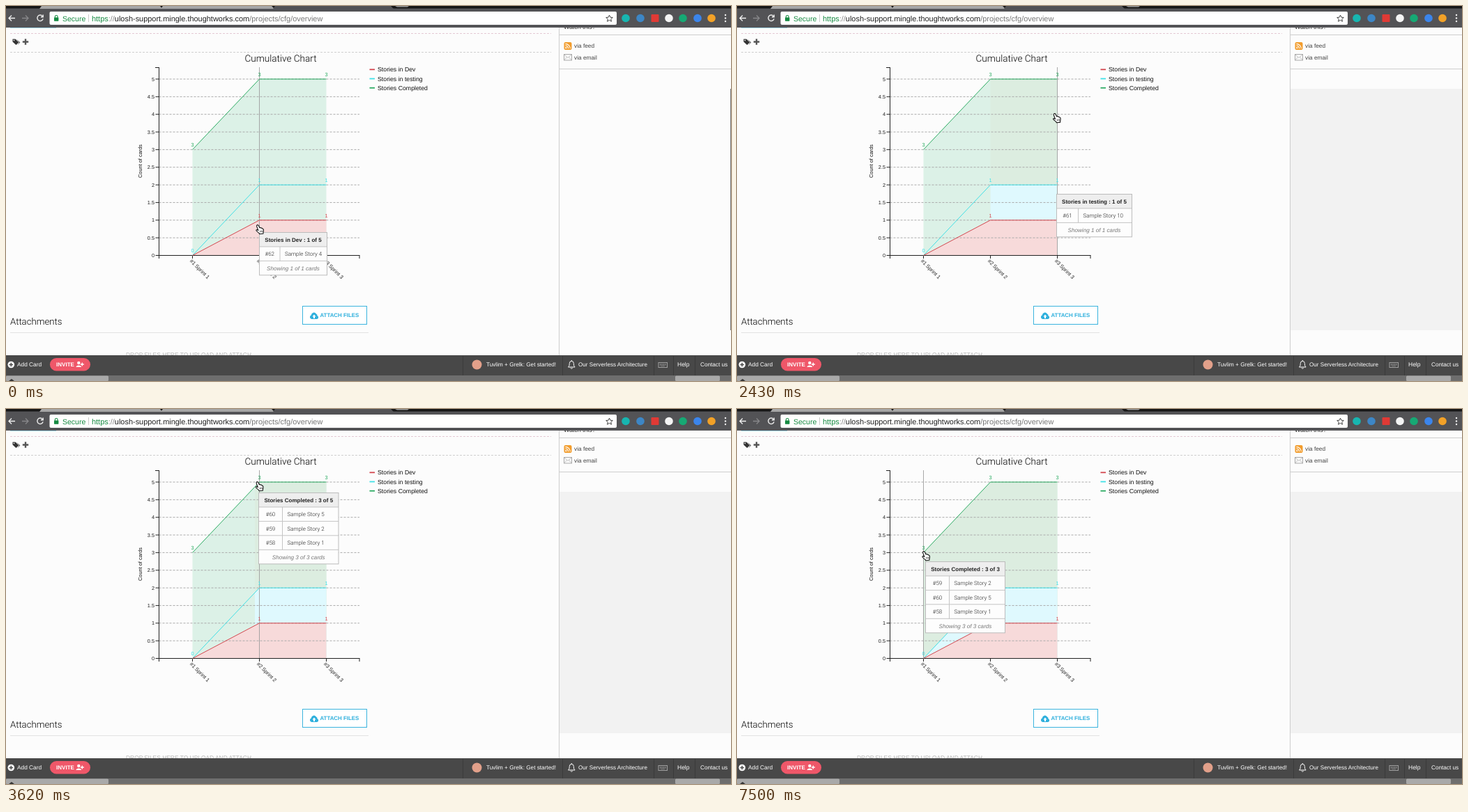
An HTML page for the animation above (8 s loop, 1040 by 539 pixels).

```html
<!DOCTYPE html>
<html lang="en">
<head>
<meta charset="utf-8">
<title>Cumulative Chart</title>
<style>
html, body { margin: 0; width: 100%; height: 100%; overflow: hidden; background: #fcfcfc; }
svg { display: block; width: 100vw; height: 100vh; font-family: "Liberation Sans", Arial, sans-serif; text-rendering: geometricPrecision; }
text { white-space: pre; }
.light { font-family: Roboto, "Liberation Sans", sans-serif; font-weight: 300; }
</style>
</head>
<body>
<svg id="stage" viewBox="0 0 1040 539" preserveAspectRatio="none"></svg>
<script>
const stage = document.getElementById('stage');
const RED = '#d3474f', CYAN = '#3fe0e6', GREEN = '#2bab62', TOOLBAR = '#535356';
const LOOP = 8000;

// Markup helpers
const rect = (x, y, w, h, fill, more = '') => `<rect x="${x}" y="${y}" width="${w}" height="${h}" fill="${fill}" ${more}/>`;
const line = (x1, y1, x2, y2, stroke, more = '') => `<path d="M${x1} ${y1}L${x2} ${y2}" stroke="${stroke}" fill="none" ${more}/>`;
const path = (d, fill, more = '') => `<path d="${d}" fill="${fill}" ${more}/>`;
const dot = (x, y, r, fill, more = '') => `<circle cx="${x}" cy="${y}" r="${r}" fill="${fill}" ${more}/>`;
const text = (x, y, s, size, fill = '#222', more = '') => `<text x="${x}" y="${y}" font-size="${size}" fill="${fill}" ${more}>${s}</text>`;
const mid = 'text-anchor="middle"', bold = 'font-weight="700"', light = 'class="light"';

// Chart scales
const px = [267.5, 363.5, 459.5];
const py = v => 358.5 - v * 50.7;
const points = vals => vals.map((v, i) => `${px[i]},${py(v).toFixed(1)}`).join(' ');
const area = (vals, fill) => `<polygon points="${points(vals)} 459.5,358.5 267.5,358.5" fill="${fill}"/>`;
const series = (vals, stroke) => `<polyline points="${points(vals)}" fill="none" stroke="${stroke}"/>`;
const dev = [0, 1, 1], testing = [0, 2, 2], done = [3, 5, 5];

function browserTop() {
  const icons = [[889, '#17b5b0'], [910, '#3d86c6'], [931, '#e03a35', 1], [951, '#f4f4f4'], [971, '#16a974'], [992, '#3b85ec'], [1012, '#f2a127']];
  return rect(0, 0, 1040, 31, TOOLBAR) + rect(0, 0, 1040, 3.5, '#161616') +
    path('M48 4L51 0H221L224 4Z', '#a6a6a6') + path('M222 4L225 0H381L385 4Z', '#a6a6a6') +
    path('M383 4L386 0H552L556 4Z', TOOLBAR) + path('M558 0H578L576 1.5H561Z', '#999') +
    path('M13 17.5H4M8 13.5L4 17.5L8 21.5', 'none', 'stroke="#f0f0f0" stroke-width="1.3"') +
    path('M23 17.5H32M28 13.5L32 17.5L28 21.5', 'none', 'stroke="#87878a" stroke-width="1.3"') +
    path('M52.3 14.6A4.2 4.2 0 1 0 53.1 18.4M53.2 12.6V15.8H50', 'none', 'stroke="#f0f0f0" stroke-width="1.4"') +
    rect(62.5, 8, 813.5, 19, '#fff', 'rx="2"') +
    rect(69, 16.5, 6.4, 5.2, '#168a42', 'rx=".6"') +
    path('M70.3 17V15.4A1.9 1.9 0 0 1 74.1 15.4V17', 'none', 'stroke="#168a42" stroke-width="1.1"') +
    text(81, 21.5, 'Secure', 10.5, '#168a42') + line(118.5, 12, 118.5, 23, '#ccc') +
    text(123, 21.5, '<tspan fill="#168a42">https</tspan><tspan fill="#888">://</tspan>ulosh-support.mingle.thoughtworks.com<tspan fill="#777">/projects/cfg/overview</tspan>', 10.95) +
    path('M865.5 13L866.9 16.2L870.3 16.5L867.7 18.8L868.5 22.2L865.5 20.4L862.5 22.2L863.3 18.8L860.7 16.5L864.1 16.2Z', 'none', 'stroke="#444"') +
    icons.map(([x, c, square]) => square ? rect(x - 5.5, 12, 11, 11, c, 'rx="1"') : dot(x, 17.5, 5.8, c)).join('') +
    [13, 17.5, 22].map(y => dot(1032, y, 1.2, '#f0f0f0')).join('');
}

function page() {
  return rect(0, 31, 1040, 471, '#fcfcfc') + line(6, 31.5, 72, 31.5, '#a5d9ee') +
    line(6, 39.5, 782, 39.5, '#e4c9d4', 'stroke-dasharray="3 2"') +
    line(6, 66.5, 782, 66.5, '#cfcfcf', 'stroke-dasharray="3 2"') +
    path('M9.5 47.5H13.5L18.3 52.2L14.5 56L9.5 51.5Z M14.8 47.5L20.2 52.3L16.4 56.2L19 52.2Z', '#333') + dot(11.5, 49.4, .8, '#fff') +
    path('M26.8 47.3H29.2V50.3H32.2V52.7H29.2V55.7H26.8V52.7H23.8V50.3H26.8Z', '#555') +
    line(793.5, 31, 793.5, 502, '#cdcdcd') +
    text(800, 33, 'Watch this?', 8.8, '#222') +
    line(794, 41.5, 1040, 41.5, '#cdcdcd') + line(794, 90.5, 1040, 90.5, '#cdcdcd') +
    rect(800.5, 52, 11, 11, '#f29c2c', 'rx="2"') + dot(803.3, 60.2, 1.1, '#fff') +
    path('M802.3 57A4 4 0 0 1 806.5 61.3M802.3 54.3A7 7 0 0 1 809.3 61.3', 'none', 'stroke="#fff" stroke-width="1.2"') +
    rect(800.5, 69.5, 11, 8.5, '#fafafa', 'stroke="#a9a9a9"') +
    path('M801 70L806 74.5L811 70M801 77.5L804.5 73.5M811 77.5L807.5 73.5', 'none', 'stroke="#b2b2b2" stroke-width=".8"') +
    text(815, 60, 'via feed', 8.3, '#444') + text(815, 77, 'via email', 8.3, '#444') +
    text(6, 457.8, 'Attachments', 13.2, '#000', light) +
    rect(425.5, 431.5, 92, 26, '#fff', 'stroke="#3bb4de"') +
    path('M438.6 450A3 3 0 0 1 437.9 444.2A3.8 3.8 0 0 1 444.9 442.4A2.7 2.7 0 0 1 446.6 445.2A2.5 2.5 0 0 1 445.8 450Z', '#2fb0dd') +
    path('M442 443.5L444.6 446.4H443V449H441V446.4H439.4Z', '#fff') +
    text(450.5, 447.4, 'ATTACH FILES', 7.9, '#2fb0dd', bold) +
    line(6, 469.5, 520, 469.5, '#e2e2e2') +
    text(172, 504, 'DROP FILES HERE TO UPLOAD AND ATTACH', 8.42, '#b5b5b5');
}

function footer() {
  const label = (x, s, size = 8.2) => text(x, 518, s, size, '#fff');
  return rect(0, 502, 1040, 29, '#484848') +
    [655.5, 798.5, 929.5, 957.5, 988.5].map(x => line(x, 503, x, 531, '#3a3a3a')).join('') +
    dot(7.3, 515.5, 4.8, '#fff') + path('M7.3 512.7V518.3M4.5 515.5H10.1', 'none', 'stroke="#484848" stroke-width="1.5"') +
    label(16, 'Add Card', 8.3) +
    rect(63, 506, 58, 18.5, '#ef5769', 'rx="9.2"') + text(72, 518, 'INVITE', 8.05, '#fff', bold) +
    dot(104.3, 513, 2.2, '#fff') + path('M100.5 519C100.5 515.5 108 515.5 108 519Z', '#fff') +
    path('M109.3 512.5V517.5M106.8 515H111.8', 'none', 'stroke="#fff" stroke-width="1.3"') +
    dot(675.5, 515.5, 7, '#e2a08a') + label(689, 'Tuvlim + Grelk: Get started!') +
    path('M806.5 519C808.5 517.5 808 515 808.3 513.5A3 3 0 0 1 814.3 513.5C814.6 515 814.1 517.5 816.1 519ZM811.3 510.5V509M810 520.3A1.4 1.4 0 0 0 812.6 520.3', 'none', 'stroke="#fff"') +
    label(821, 'Our Serverless Architecture', 8.1) +
    rect(936, 512.5, 12.5, 7, 'none', 'stroke="#a0a0a0"') +
    path('M938 514.7H947M938 516H947M939.5 517.6H945', 'none', 'stroke="#a0a0a0" stroke-dasharray="1 .7"') +
    label(963, 'Help', 8.5) + label(996, 'Contact us') +
    rect(0, 531, 1040, 8, '#6e6e6e') + rect(0, 531.5, 147, 7.5, '#a9a9a9', 'rx="1.5"') +
    rect(960, 531.5, 64, 7.5, '#a9a9a9', 'rx="1.5"') + path('M4 539L8 536L12 539Z', '#333');
}

function chart() {
  const steps = Array.from({ length: 11 }, (_, i) => i / 2);
  const tag = (i, v, s, fill) => text(px[i], py(v) - 4.3, s, 7.4, fill, mid);
  const legend = (i, s, c) => line(521.5, 91.3 + i * 13.2, 529, 91.3 + i * 13.2, c, 'stroke-width="1.8"') + text(533, 94.3 + i * 13.2, s, 8.75, '#111');
  return text(394, 80, 'Cumulative Chart', 13.6, '#000', `${light} ${mid}`) +
    area(done, '#dcf1e7') +
    `<g clip-path="url(#fresh)">${area(done, '#dcede0')}${area(testing, '#dff9fe')}</g>` +
    area(dev, '#f7dada') +
    steps.slice(1).map(v => line(219.5, py(v), 507, py(v), '#aaa', 'stroke-dasharray="3 2"')).join('') +
    line(0, 88, 0, 358, '#999', 'id="guide" stroke-width=".85"') +
    line(219.5, 88, 219.5, 358.5, '#222') + line(219, 358.5, 507.5, 358.5, '#222') +
    line(214, 88.5, 219.5, 88.5, '#222') +
    steps.map(v => line(214.5, py(v), 219.5, py(v), '#222') + text(213, py(v) + 2.6, v, 7.3, '#222', 'text-anchor="end"')).join('') +
    [219.5, ...px, 507].map(x => line(x, 358.5, x, 363, '#222')).join('') +
    px.map((x, i) => text(0, 0, `#${i + 1} Sprint ${i + 1}`, 7.5, '#222', `transform="translate(${x - 4.3} 367) rotate(45)"`)).join('') +
    text(0, 0, 'Count of cards', 7.4, '#111', `${mid} transform="translate(194.8 223) rotate(-90)"`) +
    series(done, GREEN) + series(testing, CYAN) + series(dev, RED) +
    tag(0, 3, 3, GREEN) + tag(1, 5, 3, GREEN) + tag(2, 5, 3, GREEN) +
    tag(0, 0, 0, CYAN) + tag(1, 2, 1, CYAN) + tag(2, 2, 1, CYAN) + tag(1, 1, 1, RED) + tag(2, 1, 1, RED) +
    legend(0, 'Stories in Dev', RED) + legend(1, 'Stories in testing', CYAN) + legend(2, 'Stories Completed', GREEN);
}

// Tooltips: each stays where it opened until the next one
const tips = [
  { at: 0, x: 363.5, y: 325.5, w: 97, col: 29.5, head: 'Stories in Dev : 1 of 5', cards: [[62, 4]] },
  { at: 770, x: 461.5, y: 272.5, w: 108, col: 31, head: 'Stories in testing : 1 of 5', cards: [[61, 10]] },
  { at: 1080, x: 458.5, y: 270.5, w: 108, col: 31, head: 'Stories in testing : 1 of 5', cards: [[61, 10]] },
  { at: 2580, x: 458.5, y: 113.5, w: 114, col: 34, head: 'Stories Completed : 3 of 5', cards: [[59, 2], [60, 5], [58, 1]] },
  { at: 3480, x: 362.5, y: 120.5, w: 114.5, col: 34, head: 'Stories Completed : 3 of 5', cards: [[60, 5], [59, 2], [58, 1]] },
  { at: 7210, x: 270.5, y: 219.5, w: 114, col: 34, head: 'Stories Completed : 3 of 3', cards: [[59, 2], [60, 5], [58, 1]] }
];

function tooltip({ x, y, w, col, head, cards }) {
  const h = 20.45, n = cards.length, cx = x + w / 2;
  const row = ([id, story], i) => {
    const top = y + h * (i + 1);
    return line(x, top, x + w, top, '#c4c4c4') + line(x + col, top, x + col, top + h, '#c4c4c4') +
      text(x + col / 2, top + 13.3, '#' + id, 8, '#222', `${light} ${mid}`) +
      text(x + col + 7, top + 13.3, 'Sample Story ' + story, 8, '#222', light);
  };
  return `<g class="tip" display="none">` + rect(x, y, w, h * (n + 2), '#fdfdfd') + rect(x, y, w, h, '#eee') +
    cards.map(row).join('') + line(x, y + h * (n + 1), x + w, y + h * (n + 1), '#c4c4c4') +
    text(cx, y + 13.6, head, 8, '#222', `${bold} ${mid}`) +
    text(cx, y + h * (n + 1) + 13.3, `Showing ${n} of ${n} cards`, 8.15, '#777', `${mid} font-style="italic"`) +
    rect(x, y, w, h * (n + 2), 'none', 'stroke="#bcbcbc"') + '</g>';
}

const hand = path('M-4.2 -5.6C-3.5 -6.9 -2 -6.3 -1.5 -5.2L-.2 -2.2C.8 -2.9 1.7 -2.4 2 -1.7C2.9 -2.1 3.6 -1.6 3.9 -.9C4.9 -1 5.3 -.2 5.4 .8C5.6 2.6 5.2 3.8 4.8 5L5 6.2L-.4 6.8L-.9 5.4C-2.4 4.6 -3.6 3.4 -4.9 2C-5.6 1 -4.4 .2 -3.4 .8L-2.2 1.5L-4.2 -3.9C-4.4 -4.5 -4.5 -5.1 -4.2 -5.6Z', '#fff', 'stroke="#111" stroke-width="1.1" stroke-linejoin="round"') +
  path('M.4 2L.9 4.4M2 1.7L2.4 4.2M3.6 1.5L3.8 3.9', 'none', 'stroke="#333" stroke-width=".7"');

stage.innerHTML = '<defs><clipPath id="fresh"><rect id="freshBox" y="80" width="300" height="300"/></clipPath></defs>' +
  page() + rect(794, 119, 246, 347, '#f2f2f2', 'id="panel"') + line(1039.5, 119, 1039.5, 466, '#777', 'id="scroll"') +
  chart() + tips.map(tooltip).join('') + `<g id="hand">${hand}</g>` + browserTop() + footer();

const el = id => document.getElementById(id);
const [guide, freshBox, panel, scroll, cursor] = ['guide', 'freshBox', 'panel', 'scroll', 'hand'].map(el);
const tipEls = [...document.querySelectorAll('.tip')];

// Cursor moves in discrete steps: start, time between steps, step count, target, easing
const smooth = k => k * k * (3 - 2 * k);
const moves = [
  { at: 150, gap: 156, n: 6, to: [461.5, 264], ease: smooth },
  { at: 1080, gap: 150, n: 1, to: [459, 262], ease: k => k },
  { at: 2130, gap: 150, n: 5, to: [458.5, 106], ease: smooth },
  { at: 3180, gap: 146, n: 4, to: [363.5, 111], ease: smooth },
  { at: 6760, gap: 148, n: 6, to: [271, 211], ease: k => 1 - (1 - k) ** 2.8 }
];

function cursorAt(t) {
  let pos = [364, 321];
  for (const m of moves) {
    if (t < m.at) break;
    const k = m.ease(Math.min(m.n, Math.floor((t - m.at) / m.gap) + 1) / m.n);
    pos = pos.map((v, i) => v + (m.to[i] - v) * k);
  }
  return pos;
}

function draw(t) {
  const [x, y] = cursorAt(t);
  cursor.setAttribute('transform', `translate(${x.toFixed(2)} ${y.toFixed(2)})`);

  const near = x < 315.5 ? 0 : x < 411.5 ? 1 : 2;
  guide.setAttribute('transform', `translate(${px[near]} 0)`);
  freshBox.setAttribute('x', near === 2 ? 363.5 : near === 0 ? 266 : t > 3000 ? 357 : 600);

  const current = tips.findLastIndex(tip => t >= tip.at);
  tipEls.forEach((g, i) => g.setAttribute('display', i === current ? 'inline' : 'none'));
  tipEls[2].setAttribute('opacity', t < 1230 ? .6 : 1);

  panel.setAttribute('display', t < 2130 ? 'none' : 'inline');
  scroll.setAttribute('opacity', t < 1980 ? 1 : t < 2130 ? .35 : 0);
}

function tick() {
  draw(performance.now() % LOOP);
  requestAnimationFrame(tick);
}
tick();
</script>
</body>
</html>
```
